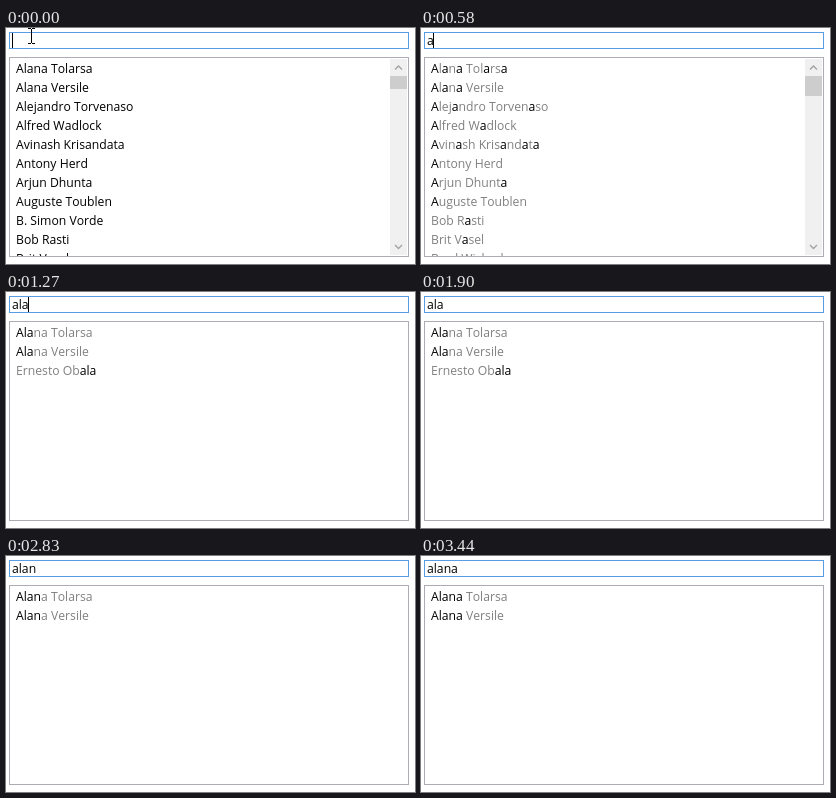
Write an HTML page that moves like this. It is 409 px wide and 236 px high and loops after 3760 ms.

```html
<!DOCTYPE html>
<html lang="en">
<head>
<meta charset="utf-8">
<title>Filter as you type</title>
<style>
html, body { margin: 0; width: 100%; height: 100%; overflow: hidden; background: #fff; }
body { position: relative; font: 12.2px "Open Sans", "Noto Sans", sans-serif; font-kerning: none; color: #000; }
div, svg, i { position: absolute; box-sizing: border-box; white-space: pre; }
#field { left: 3px; top: 4px; width: 400px; height: 17px; padding-left: 2px; border: 1px solid #569de5; line-height: 15px; }
#caret { width: 1px; height: 15px; margin-left: -.45px; background: #000; }
#list { left: 3px; top: 29px; width: 400px; height: 200px; border: 1px solid #abadb3; overflow: hidden; }
#rows { left: 6px; top: 1px; line-height: 19px; }
#rows p { margin: 0; height: 19px; }
#rows .dim { color: #808080; }
#rows b { font-weight: normal; color: #000; }
#bar { left: 380px; top: 1px; width: 17px; height: 196px; background: #f0f0f0; }
#thumb { left: 0; top: 17px; width: 17px; background: #cdcdcd; }
#bar svg { left: 0; top: 0; }
#pointer { left: 20px; top: 0; }
</style>
</head>
<body>
<div id="field"><span id="query"></span><i id="caret"></i></div>
<div id="list">
  <div id="rows"></div>
  <div id="bar">
    <div id="thumb"></div>
    <svg width="17" height="196" fill="none" stroke="#a3a3a3" stroke-width="1.4">
      <path d="M5 10.5L8.5 7L12 10.5M5 186L8.5 189.5L12 186"/>
    </svg>
  </div>
</div>
<svg id="pointer" width="11" height="18" fill="none" stroke="#000">
  <path d="M2 .5H5M6 .5H9M5.5 1V15M2 15.5H5M6 15.5H9"/>
</svg>
<script>
const people = [
  "Alana Tolarsa", "Alana Versile", "Alejandro Torvenaso", "Alfred Wadlock",
  "Avinash Krisandata", "Antony Herd", "Arjun Dhunta", "Auguste Toublen",
  "B. Simon Vorde", "Bob Rasti", "Brit Vasel", "Brad Wicksel",
  "Bruno Hensovald", "Hardeep Jodhu Vall", "J Aldren", "Kendall P. Thornes, Jr.",
  "Ernesto Obala", "Scott Halgren", "Waldo Ambridge"
];
const thumbHeights = { "": 13, a: 20, al: 147 };
const LOOP = 3760;

// Each step: start time, typed text, filter applied, caret shown
const steps = [
  [0, "", "", true],
  [270, "", "", false],
  [500, "a", "", true],
  [580, "a", "a", true],
  [960, "al", "al", true],
  [1270, "ala", "ala", true],
  [1900, "ala", "ala", false],
  [2280, "alan", "alan", true],
  [2830, "alan", "alan", false],
  [2910, "alana", "alana", true],
  [3440, "alana", "alana", false]
];

const el = id => document.getElementById(id);
const show = (id, on) => el(id).style.display = on ? "" : "none";

function rowsFor(filter) {
  if (!filter) return people.slice(0, 11).map(name => `<p>${name}</p>`).join("");
  const pattern = new RegExp(filter, "gi");
  return people
    .filter(name => name.toLowerCase().includes(filter))
    .slice(0, 11)
    .map(name => `<p class="dim">${name.replace(pattern, "<b>$&</b>")}</p>`)
    .join("");
}

let current;
function render(time) {
  const step = steps.findLast(([start]) => start <= time);
  if (step === current) return;
  current = step;
  const [start, typed, filter, caretOn] = step;
  el("query").textContent = typed;
  el("rows").innerHTML = rowsFor(filter);
  el("thumb").style.height = (thumbHeights[filter] || 0) + "px";
  show("bar", filter in thumbHeights);
  show("caret", caretOn);
  show("pointer", start < 500);
}

const origin = performance.now();
function tick() {
  render((performance.now() - origin) % LOOP);
  requestAnimationFrame(tick);
}
tick();
</script>
</body>
</html>
```
